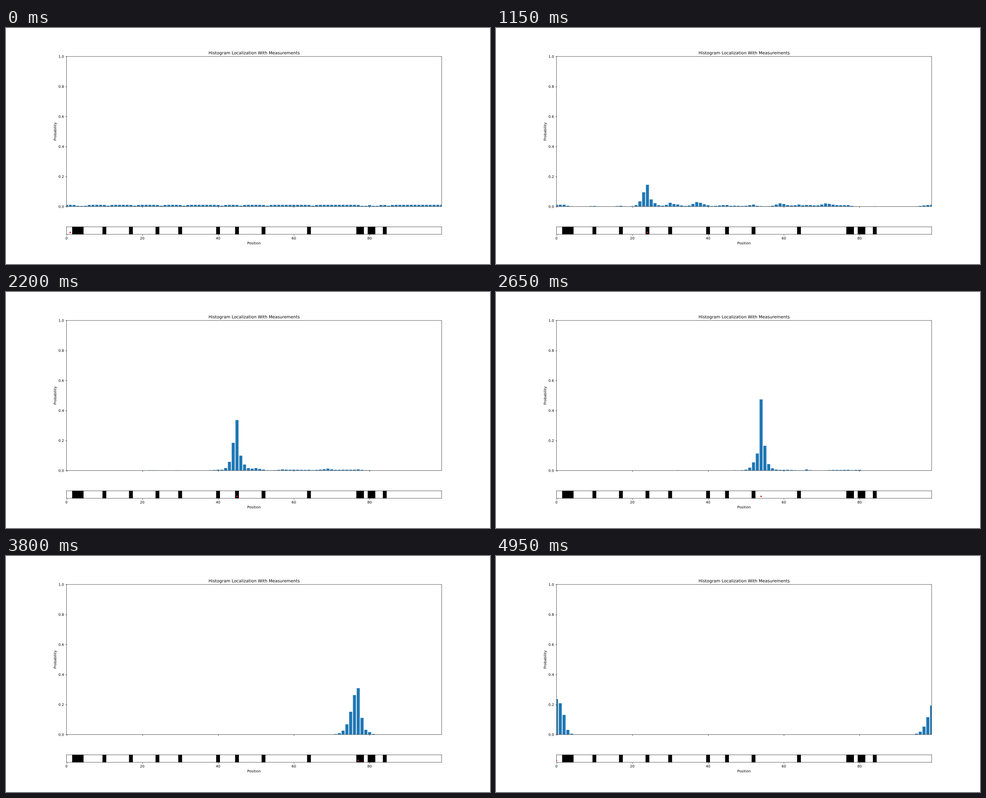
A matplotlib script that plays this animation: 1068 px wide and 524 px high, repeating every 5 s.

```python
import numpy as np
import matplotlib.pyplot as plt
from matplotlib.animation import FuncAnimation
from matplotlib.patheffects import Normal

CELLS = 100
LANDMARKS = [2, 3, 4, 10, 17, 24, 30, 40, 45, 52, 64, 77, 78, 80, 81, 84]
P_HIT, P_MISS = 0.6, 0.2
P_EXACT, P_SLIP = 0.8, 0.1

SCALE = 1068 / 1920  # default sizes shrunk to the small stage
plt.rcParams.update({
    "font.family": "DejaVu Sans",
    "font.size": 10 * SCALE,
    "axes.linewidth": 0.8 * SCALE,
    "axes.titlepad": 6 * SCALE,
    "axes.labelpad": 4 * SCALE,
    "lines.markersize": 6 * SCALE,
    "toolbar": "None",
    # Outline text and unsnapped paths keep sub-pixel positions.
    "text.hinting": "none",
    "path.snap": False,
    "path.effects": [Normal()],
})
for axis in ("xtick", "ytick"):
    plt.rcParams[f"{axis}.major.size"] = 3.5 * SCALE
    plt.rcParams[f"{axis}.major.pad"] = 3.5 * SCALE
    plt.rcParams[f"{axis}.major.width"] = 0.8 * SCALE

world = np.zeros(CELLS, dtype=int)
world[LANDMARKS] = 1


def sense(belief, reading):
    posterior = belief * np.where(world == reading, P_HIT, P_MISS)
    return posterior / posterior.sum()


def move(belief):
    return (P_EXACT * np.roll(belief, 1)
            + P_SLIP * belief
            + P_SLIP * np.roll(belief, 2))


def run_filter():
    belief = np.full(CELLS, 1 / CELLS)
    history = []
    for position in range(CELLS):
        belief = move(sense(belief, world[position]))
        history.append(belief)
    return history


beliefs = run_filter()

fig, (ax, track) = plt.subplots(
    2, 1, sharex=True, figsize=(10.68, 5.24), dpi=100,
    gridspec_kw=dict(height_ratios=[10, 1], hspace=0.2,
                     left=0.125, right=0.9, bottom=0.11, top=0.8795))

ax.set_title("Histogram Localization With Measurements")
ax.set_ylabel("Probability")
ax.set_ylim(0, 1)
bars = ax.bar(np.arange(CELLS), beliefs[0], color="#1f77b4")

track.stairs(2 * world - 0.5, np.arange(CELLS + 1) - 0.5, baseline=-0.5,
             fill=True, color="black", linewidth=0)
robot, = track.plot([1], [1], "r.", markeredgewidth=SCALE)
track.set_aspect("equal", adjustable="box")
track.set_xlabel("Position")
track.set_yticks([])
track.set_ylim(1.5, -0.5)
track.set_xlim(0, CELLS - 1)
track.set_xticks(range(0, CELLS, 20))


def update(step):
    for bar, height in zip(bars, beliefs[step]):
        bar.set_height(height)
    robot.set_data([(step + 1) % CELLS], [1])
    return [*bars, robot]


anim = FuncAnimation(fig, update, frames=CELLS, interval=50, repeat=True)
plt.show()
```
